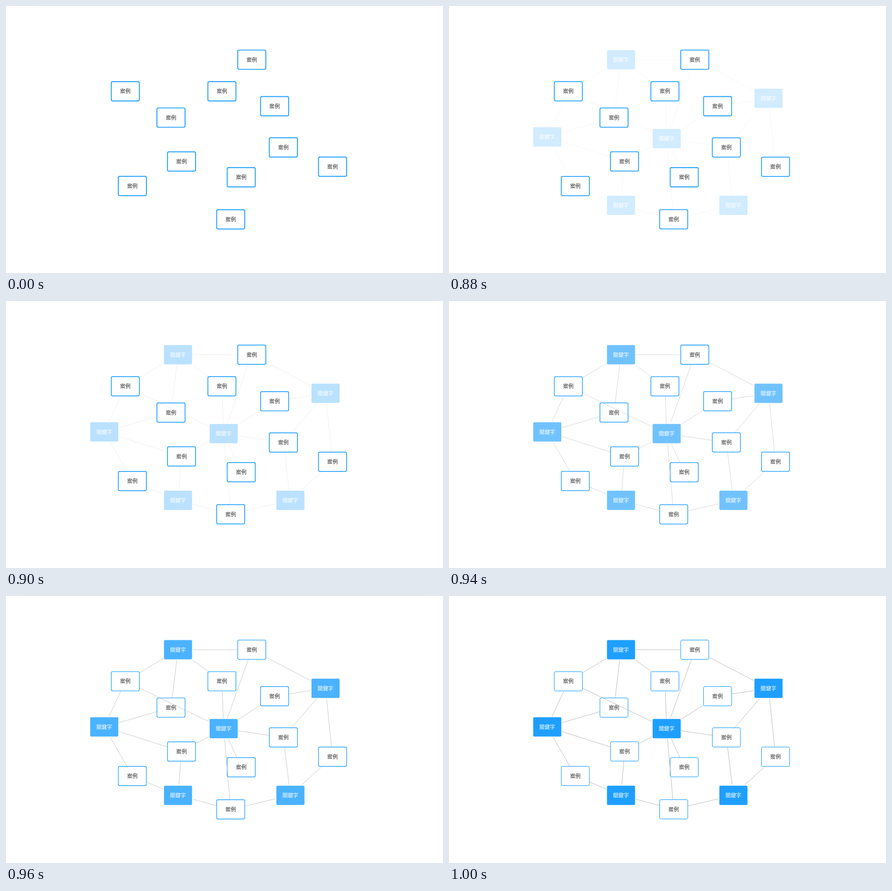
Write an HTML page that moves like this. It is 837 by 512 pixels and loops after 1900 ms.

```html
<!DOCTYPE html>
<html lang="zh-Hant">
<head>
<meta charset="utf-8">
<title>關鍵字</title>
<style>
@property --p { syntax: "<number>"; inherits: true; initial-value: 0; }
html, body { margin: 0; width: 100%; height: 100%; overflow: hidden; background: #fff; }
svg {
  display: block; width: 837px; height: 512px;
  font: 10.09px "Noto Sans CJK TC", "Noto Sans CJK SC", "Noto Sans CJK JP", "Noto Sans CJK", sans-serif;
  text-anchor: middle;
  animation: reveal 1900ms infinite;
}
#cases rect { fill: #fff; stroke: #189cff; stroke-width: calc(1.7px - .7px * var(--p)); rx: 2.7px; }
#cases text { fill: #333; }
#keys { opacity: var(--p); }
#keys rect { fill: #1e9fff; rx: 2px; }
#keys text { fill: #fff; }
#links { opacity: calc(1.1 * var(--p) - .1); stroke: #b5b5b5; stroke-width: .85px; }

/* Fade in 20 ms steps from 860 to 1000 ms, fastest in the middle */
@keyframes reveal {
  0% { --p: 0; animation-timing-function: step-end; }
  45.26% { --p: .1; animation-timing-function: steps(2); }
  47.36% { --p: .3; animation-timing-function: steps(3); }
  50.52% { --p: .8; animation-timing-function: steps(2); }
  52.63%, 100% { --p: 1; }
}
</style>
</head>
<body>
<svg viewBox="0 0 837 512">
  <g id="cases"></g>
  <g id="links"></g>
  <g id="keys"></g>
</svg>
<script>
// Nodes sit on a grid; every box is 16 by 11 cells
const G = 3.3634, LEFT = 188.2, TOP = 103;
const W = 16 * G, H = 11 * G;

const keys = {
  A: [42, 0], B: [126, 22], C: [0, 44], D: [68, 45], E: [42, 83], F: [106, 83]
};

// Column, row and the keys each case is linked to
const cases = [
  [84, 0, "ABD"], [12, 18, "ACD"], [67, 18, "AD"], [97, 26.5, "BD"],
  [38, 33, "AC"], [102, 50, "BDF"], [44, 58, "CDE"], [130, 61, "BF"],
  [78, 67, "D"], [16, 72, "CE"], [72, 91, "DEF"]
];

const group = id => document.getElementById(id);
const place = ([col, row]) => [LEFT + col * G, TOP + row * G];

function add(parent, tag, attrs, text = "") {
  const el = document.createElementNS("http://www.w3.org/2000/svg", tag);
  for (const k in attrs) el.setAttribute(k, attrs[k]);
  el.textContent = text;
  parent.append(el);
}

function box(parent, [x, y], label) {
  add(parent, "rect", { x: x - W / 2, y: y - H / 2, width: W, height: H });
  add(parent, "text", { x, y: y + 3.8 }, label);
}

// Point where the ray from a to b leaves the padded box around a
function exit(a, b, pad) {
  const dx = b[0] - a[0], dy = b[1] - a[1];
  const t = Math.min((W / 2 + pad) / Math.abs(dx), (H / 2 + pad) / Math.abs(dy));
  return [a[0] + dx * t, a[1] + dy * t];
}

for (const node of cases) {
  const at = place(node);
  box(group("cases"), at, "案例");
  for (const name of node[2]) {
    const key = place(keys[name]);
    const [x1, y1] = exit(key, at, 1.5);
    const [x2, y2] = exit(at, key, 0.5);
    add(group("links"), "line", { x1, y1, x2, y2 });
  }
}
for (const key of Object.values(keys)) box(group("keys"), place(key), "關鍵字");
</script>
</body>
</html>
```
